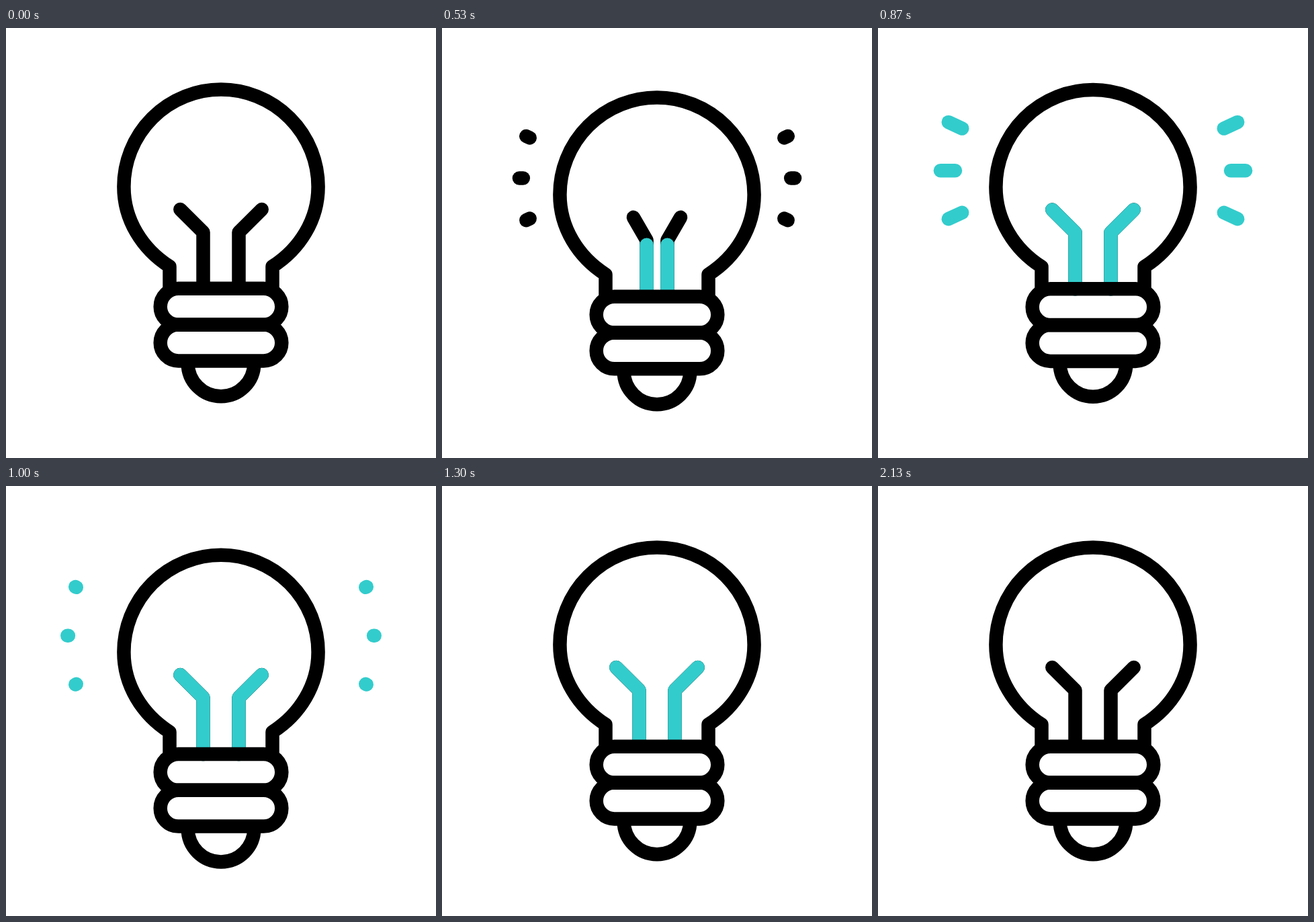
Write an HTML page with a canvas that moves like this. It is 640 px wide and 640 px high and loops after 2500 ms.

```html
<!DOCTYPE html>
<html lang="en">
<head>
<meta charset="utf-8">
<title>Light bulb</title>
<style>
  html, body { margin: 0; width: 100%; height: 100%; overflow: hidden; background: #fff; }
  canvas { display: block; width: 640px; height: 640px; }
</style>
</head>
<body>
<canvas id="stage" width="640" height="640"></canvas>
<script>
const ctx = document.getElementById('stage').getContext('2d');
const BLACK = '#000', TEAL = '#33cccc';
const FPS = 30, LOOP = 2500, DROP = 23.2;

// Eased progress of tick n from a to b, clamped to 0..1.
function ease(n, a, b) {
  const u = Math.min(1, Math.max(0, (n - a) / (b - a)));
  return u * u * (3 - 2 * u);
}

// Rises over a..b, holds, falls over c..d.
const pulse = (n, a, b, c, d) => ease(n, a, b) - ease(n, c, d);

// Strokes the part of a polyline between the fractions from and to.
function strokePart(points, color, from = 0, to = 1) {
  if (to - from < 0.001) return;
  let length = 0;
  ctx.beginPath();
  points.forEach(([x, y], i) => {
    ctx.lineTo(x, y);
    if (i) length += Math.hypot(x - points[i - 1][0], y - points[i - 1][1]);
  });
  ctx.strokeStyle = color;
  if (from > 0 || to < 1) {
    ctx.setLineDash([(to - from) * length, length * 1.1]);
    ctx.lineDashOffset = -from * length;
  }
  ctx.stroke();
  ctx.setLineDash([]);
}

// Runs draw for the left half and again mirrored for the right.
function bothSides(draw) {
  for (const side of [1, -1]) {
    ctx.save();
    ctx.translate(320, 0);
    ctx.scale(side, 1);
    ctx.translate(-320, 0);
    draw();
    ctx.restore();
  }
}

function drawFilament(n) {
  const squeeze = pulse(n, 9, 18, 22, 26);
  const x = 293.5 + 12.7 * squeeze;
  const wire = [[x, 387.8], [x, 304], [259.3 + 29.3 * squeeze, 270]];
  const lit = pulse(n, 9, 21, 52, 64);
  bothSides(() => {
    strokePart(wire, BLACK);
    strokePart(wire, TEAL, 0, lit);
  });
}

function drawRays(n) {
  const rays = [
    [[130.7, 151.6], [103.3, 139]],
    [[120.8, 211.7], [91.3, 211.7]],
    [[130.7, 271.8], [103.3, 284.4]]
  ];
  bothSides(() => {
    for (const [color, delay] of [[BLACK, 0], [TEAL, 6]]) {
      const from = ease(n - delay, 18, 25);
      const to = ease(n - delay, 14, 21);
      rays.forEach(ray => strokePart(ray, color, from, to));
    }
  });
}

function drawBulb() {
  ctx.strokeStyle = BLACK;
  ctx.beginPath();
  ctx.moveTo(243.5, 387.8);
  ctx.lineTo(243.5, 355);
  ctx.bezierCurveTo(202.5, 328.8, 175.4, 285.3, 175.4, 236.2);
  ctx.arc(320, 236.2, 144.6, Math.PI, 0);
  ctx.bezierCurveTo(464.6, 285.3, 437.5, 328.8, 396.5, 355);
  ctx.lineTo(396.5, 387.8);
  ctx.stroke();

  for (const y of [387.8, 441.6]) {
    ctx.beginPath();
    ctx.roundRect(229.7, y, 180.6, 53.9, 26.9);
    ctx.stroke();
  }

  ctx.beginPath();
  ctx.arc(320, 499, 49.3, 0, Math.PI);
  ctx.stroke();
}

function render(time) {
  // The small offset lines ticks up with a clock of 10 ms steps.
  const n = Math.floor(((time % LOOP) + 4) * FPS / 1000);
  const drop = DROP * (pulse(n, 12.4, 19.5, 19.6, 26.6) + pulse(n, 26.6, 33.6, 33.6, 39));
  ctx.fillStyle = '#fff';
  ctx.fillRect(0, 0, 640, 640);
  ctx.save();
  ctx.translate(0, drop);
  ctx.lineWidth = 20.5;
  ctx.lineCap = ctx.lineJoin = 'round';
  drawRays(n);
  drawFilament(n);
  drawBulb();
  ctx.restore();
}

const start = performance.now();
function tick() {
  render(performance.now() - start);
  requestAnimationFrame(tick);
}
tick();
</script>
</body>
</html>
```
